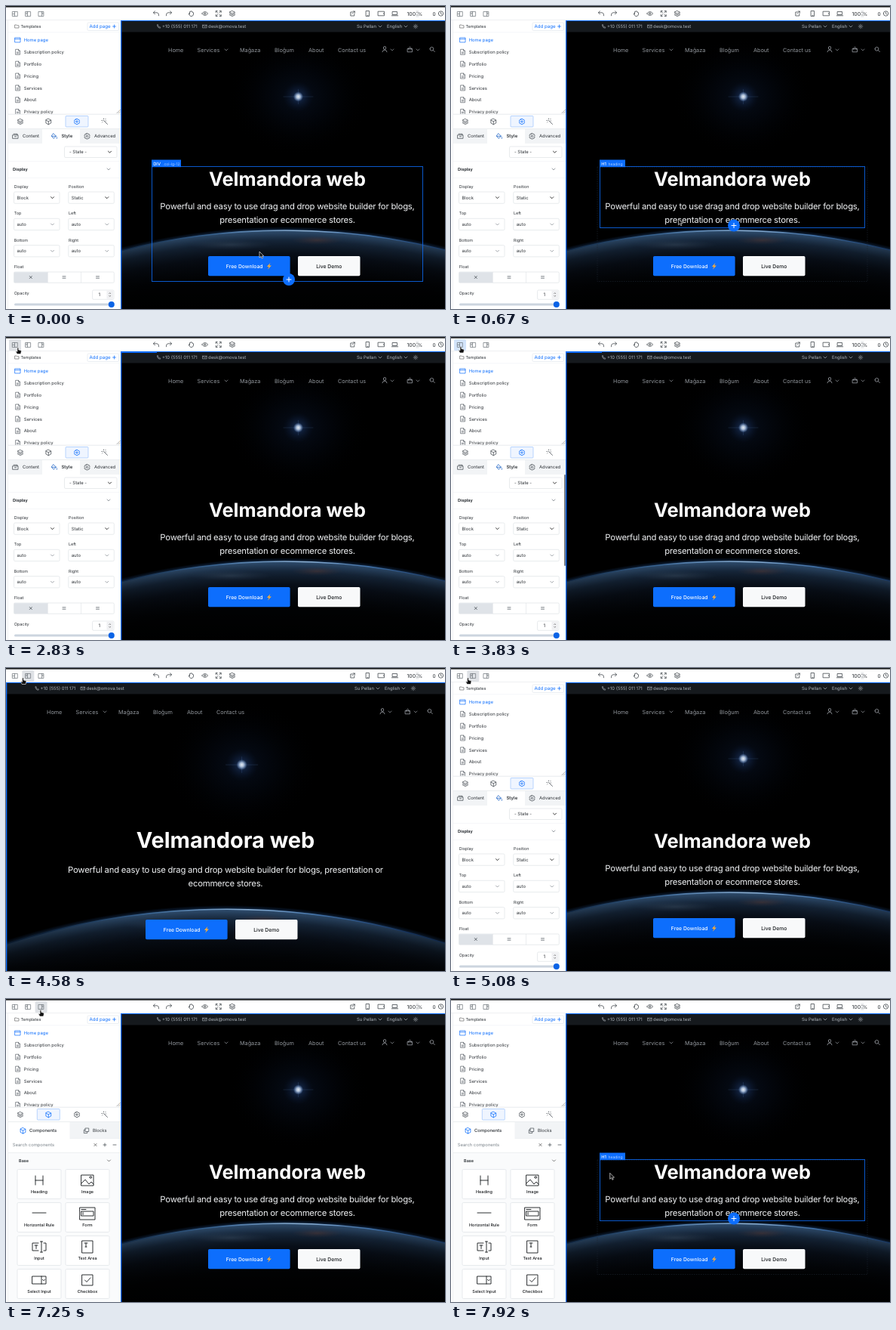
Animation, 582 px wide and 401 px high, one loop 8 s. Source, as an HTML page:

```html
<!DOCTYPE html>
<html lang="en">
<head>
<meta charset="utf-8">
<title>Page builder</title>
<style>
html, body { margin: 0; width: 100%; height: 100%; overflow: hidden; background: #fff; }
svg { display: block; width: 100vw; height: 100vh; font-family: Inter, "Liberation Sans", sans-serif; text-rendering: geometricPrecision; }
</style>
</head>
<body>
<svg id="stage" viewBox="0 0 582 401" preserveAspectRatio="none"></svg>
<script>
const LOOP = 8000, STEP = 1000 / 12;
const BLUE = '#0d6efd', INK = '#2b3035', MUTED = '#b0b6bd', EDGE = '#dee2e6';
const stage = document.getElementById('stage');

// Drawing helpers: text is centred on y, icons are strokes around a point.
const text = (s, x, y, size = 5.9, fill = INK, extra = '') =>
  `<text x="${x}" y="${(y + size * 0.364).toFixed(2)}" font-size="${size}" fill="${fill}" ${extra}>${s}</text>`;
const mid = (s, x, y, size, fill, extra = '') => text(s, x, y, size, fill, 'text-anchor="middle" ' + extra);
const rect = (x, y, w, h, fill, extra = '') =>
  `<rect x="${x}" y="${y}" width="${w}" height="${h}" fill="${fill}" ${extra}/>`;
const frame = (x, y, w, h, stroke = EDGE, fill = '#fff', r = 1.5) =>
  rect(x, y, w, h, fill, `stroke="${stroke}" stroke-width=".7" rx="${r}"`);
const icon = (d, x, y, color = '#444b52', w = 0.75) =>
  `<path transform="translate(${x} ${y})" d="${d}" fill="none" stroke="${color}" stroke-width="${w}" stroke-linecap="round" stroke-linejoin="round"/>`;
const group = (id, body, extra = '') => `<g id="${id}" ${extra}>${body}</g>`;
const circle = r => `M${-r} 0a${r} ${r} 0 1 0 ${2 * r} 0a${r} ${r} 0 1 0 ${-2 * r} 0`;
const BOLD = 'font-weight="600"', MEDIUM = 'font-weight="500"';

const I = {
  down: 'M-2 -1L0 1L2 -1',
  plus: 'M-2 0H2M0 -2V2',
  minus: 'M-2 0H2',
  cross: 'M-1.6 -1.6L1.6 1.6M1.6 -1.6L-1.6 1.6',
  doc: 'M-2.5 -3.5H1L3 -1.5V3.5H-2.5ZM1 -3.5V-1.5H3M-1.2 .3H1.5M-1.2 1.8H1.5',
  win: 'M-3.5 -3H3.5V3H-3.5ZM-3.5 -1.2H3.5',
  layers: 'M0 -3.5L3.6 -1.7L0 0L-3.6 -1.7ZM-3.6 0L0 1.8L3.6 0M-3.6 1.8L0 3.6L3.6 1.8',
  cube: 'M0 -3.8L3.4 -2V2L0 3.8L-3.4 2V-2ZM-3.4 -2L0 -.2L3.4 -2M0 -.2V3.8',
  gear: circle(1.2) + 'M-1 -3.6H1L1.5 -2.5L2.7 -2.7L3.6 -1L2.9 0L3.6 1L2.7 2.7L1.5 2.5L1 3.6H-1L-1.5 2.5L-2.7 2.7L-3.6 1L-2.9 0L-3.6 -1L-2.7 -2.7L-1.5 -2.5Z',
  wand: 'M-.8 -.8L3.5 3.5M-1.8 -1.8L-.8 -.8M-1.5 -4V-3.3M-4 -1.5H-3.3M.7 -3.2L1.1 -3.6M-3.4 1L-3 .6M1 -1H1.5',
  box: 'M-3.5 -1.5H3.5V3H-3.5ZM-2.5 -3H2.5V-1.5M-1 .5H1',
  paint: 'M-1 -3.5L2.5 0L-1 3L-3.5 0ZM-3.3 0H2.3M3.4 1.5V3',
  copies: 'M-1.2 -3.3H3.2V1.2H-1.2ZM-1.2 -1.2H-3.2V3.3H1.2V1.2',
  colA: 'M-3.3 -3H3.3V3H-3.3ZM-.5 -3V3M-3.3 0H-.5',
  colB: 'M-3.3 -3H3.3V3H-3.3ZM-.8 -3V3M-2.6 -1.4H-1.6M-2.6 0H-1.6',
  colC: 'M-3.3 -3H3.3V3H-3.3ZM.8 -3V3M1.6 -1.4H2.6M1.6 0H2.6',
  undo: 'M-1.5 -3.2L-3.6 -1.2L-1.5 .8M-3.6 -1.2H1.5Q3.6 -1 3.6 2.8',
  redo: 'M1.5 -3.2L3.6 -1.2L1.5 .8M3.6 -1.2H-1.5Q-3.6 -1 -3.6 2.8',
  hand: 'M-2 .5V-2.3Q-1.3 -3 -.9 -2.3V-3Q0 -3.8 .6 -3V-2.4Q1.4 -3 1.9 -2.2V-1.5Q2.8 -2 3 -1V1Q2.6 3.5 .5 3.5H-.6Q-1.8 3.2 -3.5 .2Q-2.8 -.6 -2 .5',
  eye: 'M-4 0Q0 -5 4 0Q0 5 -4 0' + circle(1.2),
  expand: 'M-3.5 -1.5V-3.5H-1.5M1.5 -3.5H3.5V-1.5M3.5 1.5V3.5H1.5M-1.5 3.5H-3.5V1.5M-3.3 -3.3L-1 -1M3.3 -3.3L1 -1M-3.3 3.3L-1 1M3.3 3.3L1 1',
  open: 'M0 -2H-2.5V3H2.5V.5M.7 -3H3V-.7M3 -3L-.3 .3',
  phone: 'M-2 -3.5H2V3.5H-2ZM-.4 2.4H.4',
  tablet: 'M-4 -2.8H4V2.8H-4ZM2.9 -.3V.3',
  laptop: 'M-3 -2.5H3V1.5H-3ZM-4.2 2.8H4.2',
  clock: circle(3.2) + 'M0 -1.8V.2L1.4 1',
  call: 'M-2 -2L-1 -2.3L-.4 -.8L-1 -.2Q-.4 .9 .4 1.2L1 .5L2.3 1.2L2 2.2Q-1.7 2.2 -2 -2',
  mail: 'M-2.6 -1.8H2.6V1.8H-2.6ZM-2.6 -1.6L0 .4L2.6 -1.6',
  sun: circle(1.2) + 'M0 -2.8V-2.2M0 2.2V2.8M-2.8 0H-2.2M2.2 0H2.8M-2 -2L-1.6 -1.6M1.6 1.6L2 2M-2 2L-1.6 1.6M1.6 -1.6L2 -2',
  user: 'M-1.5 -2A1.6 1.6 0 1 0 1.6 -2A1.6 1.6 0 1 0 -1.5 -2M-3 3.3Q-2.6 .6 0 .6Q2.6 .6 3 3.3',
  bag: 'M-3 -1H3V3.3H-3ZM-1.5 .2V-2Q0 -4.5 1.5 -2V.2',
  search: 'M-3 -.7A2.4 2.4 0 1 0 1.8 -.7A2.4 2.4 0 1 0 -3 -.7M1.2 1L3.4 3.2',
  lines: 'M-2 -1.5H2M-2 0H2M-2 1.5H2',
  spin: 'M-1 -1.3L0 -2.4L1 -1.3M-1 1.3L0 2.4L1 1.3'
};

// ---------- website preview ----------
function sky(cx, scale) {
  return `<g transform="translate(${cx} 19) scale(${scale})">
    <ellipse cx="20" cy="101" rx="95" ry="80" fill="url(#haze)"/>
    <circle cx="20" cy="101" r="20" fill="url(#glow)"/>
    <path d="M0 101H40M20 91V111" stroke="#6f9ad6" stroke-width=".6" opacity=".25"/>
    <circle cx="20" cy="101" r="6.5" fill="url(#core)"/>
    <circle cx="2" cy="1158" r="885" fill="url(#air)"/>
    <circle cx="2" cy="1158" r="880" fill="url(#earth)"/>
    <ellipse cx="45" cy="291" rx="34" ry="6" fill="url(#land)"/>
    <ellipse cx="-70" cy="297" rx="55" ry="7" fill="url(#cloud)"/>
    <circle cx="2" cy="1158" r="880" fill="none" stroke="url(#rim)" stroke-width="1.3"/>
    <rect x="-330" y="280" width="660" height="140" fill="url(#night)"/>
  </g>`;
}
const bolt = (x, y) => `<path transform="translate(${x} ${y}) scale(1.15)" d="M1.4 -3.7L-2.5 .6H-.2L-1.6 3.8L2.7 -.8H.3Z" fill="#ffac33"/>`;
const buttons = (x1, y1, w1, x2, y2, w2) =>
  rect(x1, y1, w1, 26.3, BLUE, 'rx="1.8"') + rect(x2, y2, w2, 26.3, '#f8f9fa', 'rx="1.8"') +
  text('Free Download', x1 + w1 / 2 - 30.5, y1 + 13.3, 6.8, '#fff', MEDIUM) + bolt(x1 + w1 / 2 + 26.5, y1 + 13.3) +
  mid('Live Demo', x2 + w2 / 2, y2 + 13.3, 6.8, '#16191c', MEDIUM);
const contact = (x, y) =>
  icon(I.call, x + 3, y, MUTED, 0.6) + text('+10 (555) 011 171', x + 7.5, y, 5.95, MUTED) +
  icon(I.mail, x + 64, y, MUTED, 0.6) + text('desk@omova.test', x + 68.5, y, 5.95, MUTED);
const choices = (x, y, gap = 0) =>
  text('Su Pellan', x, y, 5.95, MUTED) + icon(I.down, x + 31, y, MUTED, 0.7) +
  text('English', x + 40 + gap, y, 5.95, MUTED) + icon(I.down, x + 65 + gap * 1.2, y, MUTED, 0.7) +
  icon(I.sun, x + 78 + gap * 2, y, MUTED, 0.6);
const copy = (cx, y, lines, step = 17.5) =>
  lines.map((s, i) => mid(s, cx, y + i * step, 11.3, '#f1f3f5', 'letter-spacing="-.02em"')).join('');
const border = (x, w) => rect(x, 19, 1.3, 382, BLUE) + rect(x, 19, w, 1, BLUE);

function wideNav(left, right) {
  const names = [['Home', 16], ['Services', 54.5], ['Mağaza', 111], ['Bloğum', 157], ['About', 202], ['Contact us', 241]];
  return names.map(([s, x]) => text(s, left + x, 58, 7.27, '#92979d')).join('') +
    icon(I.down, left + 93, 58, '#92979d', 0.7) +
    icon(I.user, right - 45, 57.5, '#a4a9af') + icon(I.down, right - 35, 58, '#92979d', 0.7) +
    icon(I.bag, right - 11.5, 57.5, '#a4a9af') + icon(I.down, right - 1, 58, '#92979d', 0.7) +
    icon(I.search, right + 18, 57.5, '#a4a9af');
}
const normalPage = group('normal',
  rect(152, 19, 430, 382, '#000') + sky(367.5, 1) + rect(153, 19, 429, 15.5, '#15191d') +
  contact(199.5, 27) + choices(465, 27) + wideNav(199, 547) +
  mid('Velmandora web', 373, 228.5, 25.4, '#fff', 'font-weight="700"') +
  copy(373, 265, ['Powerful and easy to use drag and drop website builder for blogs,', 'presentation or ecommerce stores.']) +
  buttons(268, 331, 108.6, 387, 331, 82.5) + border(152, 430), 'clip-path="url(#pageClip)"');
const fullPage = group('full',
  rect(0, 19, 582, 382, '#000') + sky(291, 1.08) + rect(0, 19, 582, 15.5, '#15191d') +
  contact(38, 27) + choices(462, 27) + wideNav(38, 544) +
  mid('Velmandora web', 291, 227, 28.9, '#fff', 'font-weight="700"') +
  copy(291, 267, ['Powerful and easy to use drag and drop website builder for blogs, presentation or', 'ecommerce stores.']) +
  buttons(185, 333, 108.6, 304, 333, 82.5) + border(0, 582));
const narrowPage = group('narrow',
  `<g clip-path="url(#slimClip)">` + rect(152, 19, 292, 382, '#000') + sky(295, 0.81) +
  rect(153, 19, 290, 41.5, '#15191d') + contact(173, 31) + choices(173, 49, 8) +
  frame(399.5, 65, 27.5, 18.5, '#3f4449', 'none', 2) +
  icon('M-5 -4H5M-5 0H5M-5 4H5', 413, 74, '#858b91', 1) +
  mid('Velmandora web', 298, 153, 20.6, '#fff', 'font-weight="700"') +
  copy(298, 186, ['Powerful and easy to use drag and drop website', 'builder for blogs, presentation or ecommerce', 'stores.'], 16.6) +
  buttons(223, 267.5, 150, 223, 302, 150) + '</g>' +
  border(152, 291) + rect(442.8, 19, 1.2, 382, BLUE) + rect(441.5, 20, 2, 29, '#3d7de0') +
  // inspector on the right
  rect(444, 19, 138, 382, '#fff') + rect(491, 19, 91, 18.5, '#f2f4f6') + rect(491, 37.3, 91, 0.6, EDGE) +
  icon(I.box, 455.5, 28) + text('Content', 465, 28, 5.95, INK, MEDIUM) +
  icon(I.paint, 506, 28) + text('Style', 516, 28) + icon(I.gear, 548.5, 28) + text('Advanced', 558.5, 28) +
  frame(453, 52, 140, 24, '#e9ecef', '#f8f9fa') +
  text('No selected element!', 462, 58, 5.9, '#16191c', BOLD) + text('Click on an element to edit.', 462, 67) +
  icon(I.cross, 574.5, 62, '#555', 0.8));

// ---------- left column ----------
const pages = ['Home page', 'Subscription policy', 'Portfolio', 'Pricing', 'Services', 'About', 'Privacy policy'];
const list = group('list', `<g clip-path="url(#listClip)">` +
  icon('M-2.5 -2H-.5L.3 -1.2H2.5V2H-2.5Z', 14.5, 27, '#555', 0.6) + text('Templates', 19.5, 27, 5.5) +
  frame(108, 22, 41.5, 10.5, '#e3e7ec') + text('Add page', 110.5, 27, 6.15, BLUE) + icon(I.plus, 143.5, 27, BLUE) +
  rect(3, 34.7, 149, 0.5, '#eceff2') +
  pages.map((s, i) => icon(i ? I.doc : I.win, 15.5, 45 + 15.85 * i, i ? '#5c636a' : BLUE, 0.7) +
    text(s, 23.7, 45 + 15.85 * i, 5.9, i ? INK : BLUE)).join('') +
  icon('M-2.5 2L2 -2.5M0 2L2 0', 149.5, 139.8, '#888', 0.7) + '</g>');

const modes = (xs, names, on, w) => names.map((n, i) =>
  (i === on ? frame(xs[i] - w / 2, 145.5, w, 14.5, '#9ec5fe', '#eff5ff', 1) : '') +
  icon(I[n], xs[i], 153, i === on ? BLUE : '#444b52')).join('') + rect(3, 162.3, 149, 0.6, EDGE);
const FOUR = [19, 56.3, 94, 131], FOUR_ICONS = ['layers', 'cube', 'gear', 'wand'];

const select = (s, x, y, strong) => frame(x, y, 60.5, 15.3) +
  text(s, x + 4, y + 7.7, 5.9) + icon(I.down, x + 51, y + 7.7, strong ? '#333' : '#7b838a', strong ? 1 : 0.7);
const field = (label, value, col, row) =>
  text(label, 10.7 + col * 72.3, 239 + row * 35.5, 5.45) + select(value, 10.5 + col * 72.3, 246 + row * 35.3, !row);
const fields = [['Display', 'Block'], ['Position', 'Static'], ['Top', 'auto'], ['Left', 'auto'], ['Bottom', 'auto'], ['Right', 'auto']];
const stylePane = group('stylePane', modes(FOUR, FOUR_ICONS, 2, 30) +
  rect(3, 163, 45, 19, '#f2f4f6') + rect(98, 163, 54, 19, '#f2f4f6') +
  icon(I.box, 12.5, 172.3) + text('Content', 22, 172.3) + icon(I.paint, 64, 172.3, '#1c62c4') +
  text('Style', 73.5, 172.3, 5.95, INK, BOLD) + icon(I.gear, 107.5, 172.3) + text('Advanced', 117, 172.3) +
  frame(77.5, 186, 69.5, 14.5) + text('- State -', 84, 193.2) + icon(I.down, 137.5, 193.2, '#333', 1) +
  rect(3, 205, 149, 0.5, '#eceff2') + text('Display', 9, 216, 5.45, INK, 'font-weight="700"') +
  icon(I.down, 136, 216, '#7b838a') + rect(3, 227, 149, 0.5, '#eceff2') +
  fields.map(([l, v], i) => field(l, v, i % 2, i >> 1)).join('') +
  text('Float', 10.7, 345, 5.45) + frame(10.5, 352, 132.8, 14.3) + rect(10.8, 352.3, 44.2, 13.7, '#dfe3e8') +
  rect(55, 352, 0.6, 14.3, EDGE) + rect(99, 352, 0.6, 14.3, EDGE) + icon(I.cross, 32.8, 359) +
  icon(I.lines, 77, 359, '#6b7178', 0.6) + icon(I.lines, 121.5, 359, '#6b7178', 0.6) +
  text('Opacity', 10.7, 380, 5.45) + frame(114.5, 376, 28.5, 12.3) + text('1', 122.5, 382, 6.2) +
  rect(133.5, 376.6, 8.5, 11, '#f0f1f3') + icon(I.spin, 137.7, 382, '#666', 0.7) +
  rect(11, 393.6, 130, 3, '#ccd5df', 'rx="1.5"') + `<circle cx="139.8" cy="395" r="4" fill="#0a63e6"/>` +
  ['Background', 'Text color'].map((s, i) => text(s, 10.7 + 72.3 * i, 415, 5.45) + frame(10.5 + 72.3 * i, 422, 60.5, 15.3)).join('') +
  rect(3, 452, 149, 0.5, '#eceff2') + text('Typography', 9, 463, 5.45, INK, 'font-weight="700"') + icon(I.down, 136, 463, '#7b838a') +
  ['Font size', 'Font weight'].map((s, i) => text(s, 10.7 + 72.3 * i, 486, 5.45) + select('auto', 10.5 + 72.3 * i, 493)).join(''));

const tiles = [
  ['Heading', 'M-5 -6V6M5 -6V6M-5 0H5'],
  ['Image', 'M-8 -7H8V7H-8ZM-8 4L-3 -1L2 5L5 2L8 5M3 -4A1.3 1.3 0 1 0 5.6 -4A1.3 1.3 0 1 0 3 -4'],
  ['Horizontal Rule', 'M-9 -1H9'],
  ['Form', 'M-10 -8H10V8H-10ZM-8 -3H8V3H-8ZM-6 -1.5V1.5M-8 -5.5H-2'],
  ['Input', 'M-1 -5H-9V5H-1M6 -5H9V5H6M-6 -2H-2M-4 -2V2.5M3 -7V7M1.5 -7H4.5M1.5 7H4.5'],
  ['Text Area', 'M-7 -8H7V8H-7ZM-4 -5H0M-2 -5V0M-3 0H-1'],
  ['Select Input', 'M-9 -5H9V5H-9ZM3 -5V5M4.5 -.7L6 .8L7.5 -.7'],
  ['Checkbox', 'M-7 -7H7V7H-7ZM-3.5 0L-1 2.5L4 -3']
];
const partsPane = group('partsPane',
  group('three', modes([25, 75, 125], ['layers', 'cube', 'wand'], 1, 42)) + group('four', modes(FOUR, FOUR_ICONS, 1, 30)) +
  rect(84.5, 163, 67.5, 21, '#f2f4f6') + rect(84.5, 184, 67.5, 0.5, EDGE) +
  icon(I.cube, 22.5, 174.3, BLUE) + text('Components', 31, 174.3, 5.95, INK, MEDIUM) +
  icon(I.copies, 106.5, 174.3, '#444b52', 0.7) +
  text('Blocks', 115, 174.3) + text('Search components', 8.8, 193, 5.85, '#7b838a') +
  icon(I.cross, 118.5, 193, '#555') + icon(I.plus, 131, 193) + icon(I.minus, 144, 193) +
  rect(3, 203, 149, 200, '#fafbfc') + rect(3, 203, 149, 0.5, EDGE) +
  text('Base', 17, 214, 5.5, INK, BOLD) + icon(I.down, 136.5, 214, '#555') +
  tiles.map(([s, d], i) => {
    const x = 15 + (i % 2) * 64, y = 225.5 + (i >> 1) * 44;
    return frame(x, y, 58, 39, '#dfe3e7') + icon(d, x + 29, y + 14.5, '#16191c', 0.9) + mid(s, x + 29, y + 29, 5.5, '#16191c', MEDIUM);
  }).join(''));

const column = group('column', rect(0, 19, 152, 382, '#fff') + list +
  group('lower', rect(3, 143, 149, 420, '#fff') + rect(3, 142.8, 149, 0.7, EDGE) + stylePane + partsPane +
    group('bar', rect(150, 182, 2, 121, '#777d84', 'rx="1"'))) +
  rect(2.2, 19, 0.6, 382, '#e4e7ea'));

// ---------- top toolbar ----------
const tools = [['undo', 199], ['redo', 216], ['hand', 245.5], ['eye', 263.7], ['expand', 281.7], ['layers', 300],
  ['open', 459.3], ['phone', 479.5], ['tablet', 497.5], ['laptop', 515.5], ['clock', 576.5]];
const toolbar = rect(0, 0, 582, 19, '#fff') + rect(0, 18.4, 582, 0.6, '#e3e6ea') + rect(0, 0, 582, 1.7, '#1c1e20') +
  `<rect id="hover" y="3" width="16" height="15" rx="1.5"/>` +
  ['colA', 'colB', 'colC'].map((n, i) => icon(I[n], 12 + 17.3 * i, 10.5, '#6b7178', 0.7)).join('') +
  tools.map(([n, x]) => icon(I[n], x, 10, '#3a4046')).join('') +
  text('100', 531.5, 10.3, 6.9) + rect(543.3, 5.5, 4, 9.5, '#eceef0') + icon(I.spin, 545.2, 10.2, '#777', 0.6) +
  text('%', 546, 10.3, 6.2) + text('0', 565.5, 10.3, 6.5);

// ---------- selection overlays ----------
const badge = (x, y) => `<circle cx="${x}" cy="${y}" r="8" fill="${BLUE}"/>` + icon('M-3 0H3M0 -3V3', x, y, '#fff', 1);
const tag = (x, w, name, cls, gap) => rect(x, 203.5, w, 9.7, BLUE) +
  text(name, x + 2.2, 208.8, 5.8, '#fff', MEDIUM) + text(cls, x + gap, 209, 5, '#a9cbff');
const outline = (x, y, w, h) => rect(x, y, w, h, 'none', `stroke="${BLUE}" stroke-opacity=".8"`);
const guide = x => rect(x, 19, 1, 382, BLUE, 'opacity=".7"');
const overlays =
  group('selDiv', outline(193.5, 212.5, 359, 152) + tag(193, 39, 'DIV', '.col-lg-12', 15) + badge(375, 362)) +
  group('selHead', rect(194, 213, 358, 151.5, 'none', 'stroke="#1d2630" stroke-width=".6" stroke-dasharray="1.5 1.5"') +
    outline(197.5, 212.5, 351, 81) + tag(197, 34, 'H1', 'heading', 11.5) + badge(375, 290.5)) +
  group('selBox', guide(199) + guide(546) + rect(199, 19, 15, 2, BLUE)) +
  group('selBody', rect(153, 19, 47, 2, BLUE));

const cursor =
  group('arrow', '<path transform="scale(.88)" d="M0 0V9.2L2.2 7.2L3.7 10.3L5.2 9.6L3.8 6.7H6.6Z" fill="#111" stroke="#ddd" stroke-width=".8"/>') +
  group('finger', '<path d="M-1 .5Q0 -.6 .8 .5V3L3.8 3.8Q4.6 4.2 4.3 5.5L3.6 8.5H-1.2L-3 5.2Q-2.6 4.2 -1 5.4Z" fill="#111" stroke="#fff" stroke-width=".6"/>');

const stop = (o, c, a = 1) => `<stop offset="${o}" stop-color="${c}" stop-opacity="${a}"/>`;
const radial = (id, stops, extra = '') => `<radialGradient id="${id}" ${extra}>${stops}</radialGradient>`;
const clip = (id, x, y, w, h) => `<clipPath id="${id}"><rect x="${x}" y="${y}" width="${w}" height="${h}"/></clipPath>`;
const globe = r => `gradientUnits="userSpaceOnUse" cx="2" cy="1158" r="${r}"`;
const defs = '<defs>' + clip('pageClip', 152, 19, 430, 382) + clip('slimClip', 152, 19, 291, 382) + clip('listClip', 0, 19, 152, 124) +
  radial('haze', stop(0, '#13294f', 0.35) + stop(0.45, '#0a1730', 0.2) + stop(1, '#000', 0)) +
  radial('glow', stop(0, '#4a78bd', 0.6) + stop(0.35, '#213f75', 0.35) + stop(1, '#0a1a3a', 0)) +
  radial('core', stop(0, '#e8eef5') + stop(0.4, '#b4c6de', 0.9) + stop(1, '#6f94cc', 0)) +
  radial('air', stop(0.994, '#2c609c', 0.5) + stop(1, '#123a78', 0), globe(885)) +
  radial('earth', stop(0.93, '#04070b') + stop(0.965, '#0c1523') + stop(0.985, '#182a40') + stop(1, '#2f4d6e'), globe(880)) +
  radial('land', stop(0, '#6b4238', 0.45) + stop(1, '#4a3940', 0)) +
  radial('cloud', stop(0, '#667f98', 0.3) + stop(1, '#435a78', 0)) +
  `<linearGradient id="rim" gradientUnits="userSpaceOnUse" x1="-225" y1="0" x2="225" y2="0">` +
  stop(0, '#143052') + stop(0.3, '#3d6a9a') + stop(0.56, '#8fb3d6') + stop(0.75, '#4577b0') + stop(1, '#1d4580') + '</linearGradient>' +
  `<linearGradient id="night" x1="0" y1="0" x2="0" y2="1">` + stop(0, '#000', 0) + stop(0.5, '#000', 0.8) + stop(0.75, '#000') + '</linearGradient></defs>';

stage.innerHTML = defs + normalPage + fullPage + narrowPage + overlays + column + toolbar + cursor;

// ---------- motion ----------
const path = [[0, 336, 325], [830, 293, 271], [1580, 192, 165], [2500, 10, 40], [2830, 16, 14], [3000, 13, 12.5],
  [4080, 13, 12.5], [4580, 22.5, 13], [5080, 22.5, 13], [6250, 46, 14.5], [7500, 46, 14.5], [7920, 212, 232]];
function pointer(t) {
  const i = path.findIndex(k => k[0] > t);
  if (i < 0) return path[path.length - 1].slice(1);
  const [a, b] = [path[i - 1], path[i]], f = (t - a[0]) / (b[0] - a[0]);
  return [a[1] + (b[1] - a[1]) * f, a[2] + (b[2] - a[2]) * f];
}
const el = id => document.getElementById(id);
const show = (id, on) => { el(id).style.display = on ? '' : 'none'; };
const within = (t, a, b) => t >= a && t < b;

function draw(ms) {
  const t = Math.floor((ms + 5) / STEP) * STEP + 5;
  const [x, y] = pointer(t - 5);
  const noList = within(t, 3580, 3830), noColumn = within(t, 4580, 5080), inspect = within(t, 6330, 7250);

  show('normal', !noColumn && !inspect);
  show('full', noColumn);
  show('narrow', inspect);
  show('column', !noColumn);
  show('list', !noList);
  el('lower').setAttribute('transform', `translate(0 ${noList ? -124 : 0})`);
  show('stylePane', t < 6330);
  show('partsPane', t >= 6330);
  show('three', inspect);
  show('four', !inspect);
  show('bar', within(t, 3580, 4250));

  const early = t < 1660;
  show('selDiv', early && y >= 293);
  show('selHead', (early || t > 7500) && within(y, 213, 293));
  show('selBox', early && y < 213);
  show('selBody', within(t, 1660, 4580));

  const overBar = y < 19, slot = x < 21 ? 0 : x < 38.5 ? 1 : 2;
  show('hover', overBar && x < 56);
  el('hover').setAttribute('x', 4 + 17.3 * slot);
  el('hover').setAttribute('fill', within(t, 3580, 4080) || inspect ? '#d3e4fb' : '#dfe2e6');
  show('arrow', !overBar);
  show('finger', overBar);
  for (const id of ['arrow', 'finger']) el(id).setAttribute('transform', `translate(${x.toFixed(2)} ${y.toFixed(2)})`);
}

const start = performance.now();
function tick(now) {
  draw(Math.max(0, now - start) % LOOP);
  requestAnimationFrame(tick);
}
draw(0);
requestAnimationFrame(tick);
</script>
</body>
</html>
```
